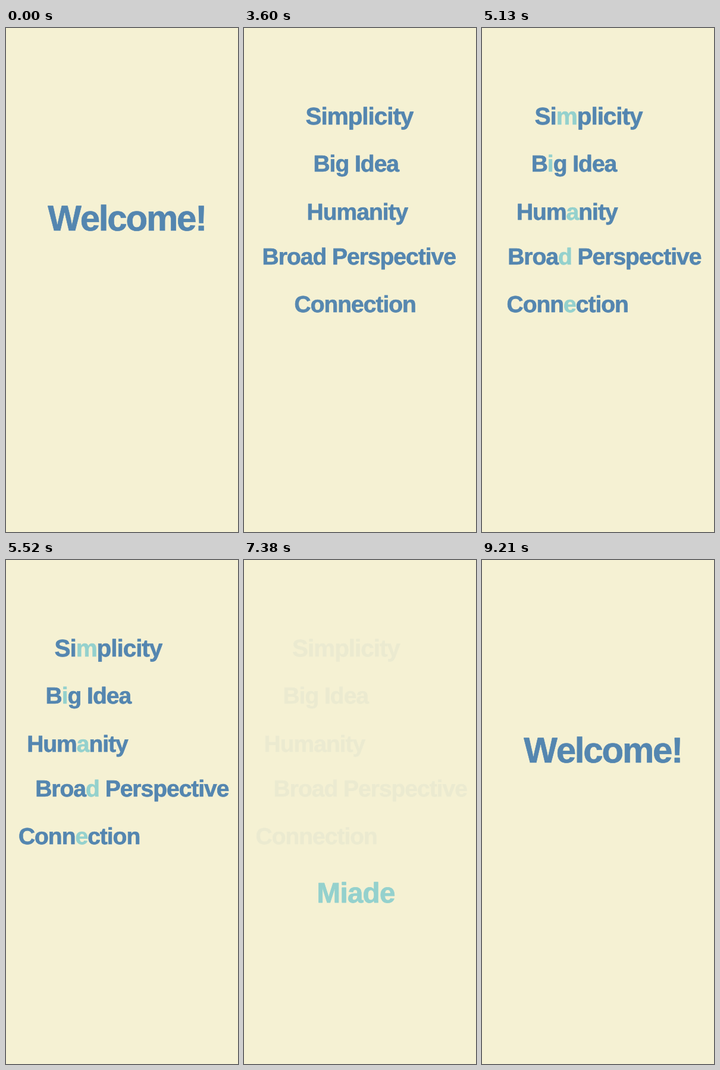
An HTML page for the animation above (9.27 s loop, 390 px wide and 846 px high).

```html
<!DOCTYPE html>
<html lang="en">
<head>
<meta charset="utf-8">
<title>Welcome</title>
<style>
  html, body { margin: 0; width: 100%; height: 100%; overflow: hidden; background: #f5f1d3; }
  svg { display: block; width: 100%; height: 100%; }
  text {
    font-family: "Liberation Sans", Arial, Helvetica, sans-serif;
    font-weight: 700;
    font-kerning: none;
    letter-spacing: -0.026em;
    text-rendering: geometricPrecision;
    fill: #5486b0;
    stroke: #5486b0;
    stroke-width: 0.7px;
    stroke-linejoin: round;
  }
  #welcome { letter-spacing: -0.037em; }
  #name { fill: #94d1cd; stroke: #94d1cd; text-anchor: middle; letter-spacing: -0.015em; }
</style>
</head>
<body>
<svg id="stage" viewBox="0 0 390 846">
  <text id="welcome" x="70.3" y="340.3" font-size="60">Welcome!</text>
  <text id="name" font-size="39">Miade</text>
</svg>
<script>
const LOOP = 9270, STEP = 30;
const BLUE = [84, 134, 176], TEAL = [148, 209, 205];

// accent: index of the highlighted letter, shift: sideways travel, show: fade-in times
const words = [
  { text: 'Simplicity',        accent: 2, x: 103.5, y: 162.4, size: 40.5, shift: -22.5, show: [430, 1060] },
  { text: 'Big Idea',          accent: 1, x: 116.4, y: 241,   size: 39,   shift: -51,   show: [1300, 1725] },
  { text: 'Humanity',          accent: 3, x: 105.6, y: 322,   size: 39,   shift: -72,   show: [1930, 2400] },
  { text: 'Broad Perspective', accent: 4, x: 30.6,  y: 397.4, size: 39,   shift: 19,    show: [2560, 2985] },
  { text: 'Connection',        accent: 4, x: 84.5,  y: 477,   size: 39,   shift: -65,   show: [3190, 3610] }
];

const stage = document.getElementById('stage');
const welcome = document.getElementById('welcome');
const nameText = document.getElementById('name');

function make(tag, text, parent) {
  const el = document.createElementNS('http://www.w3.org/2000/svg', tag);
  el.textContent = text;
  parent.appendChild(el);
  return el;
}

for (const w of words) {
  w.el = make('text', '', stage);
  w.el.setAttribute('y', w.y);
  w.el.setAttribute('font-size', w.size);
  const { text, accent } = w;
  make('tspan', text.slice(0, accent), w.el);
  w.letter = make('tspan', text[accent], w.el);
  make('tspan', text.slice(accent + 1), w.el);
}

const ramp = (t, a, b) => Math.min(1, Math.max(0, (t - a) / (b - a)));
const ease = p => (1 - Math.cos(Math.PI * p)) / 2;
const mix = (a, b, p) => a + (b - a) * p;

function draw(t) {
  const slide = ease(ramp(t, 4350, 5640));
  const leave = 1 - ramp(t, 7030, 7400);
  const tint = ramp(t, 3790, 4215) * leave;
  const color = `rgb(${BLUE.map((c, i) => Math.round(mix(c, TEAL[i], tint)))})`;

  for (const w of words) {
    w.el.setAttribute('x', w.x + w.shift * slide);
    w.el.setAttribute('opacity', ramp(t, ...w.show) * leave);
    w.letter.style.fill = w.letter.style.stroke = color;
  }

  const first = 1 - ramp(t, 430, 1060);
  welcome.setAttribute('opacity', Math.max(first, ramp(t, 8480, 9210)));

  const rise = ease(ramp(t, 7060, 8335));
  const scale = mix(1, 2.48, rise);
  nameText.setAttribute('transform',
    `translate(${mix(187.5, 191.5, rise)} ${mix(613, 354, rise)}) scale(${scale})`);
  nameText.setAttribute('opacity', ramp(t, 5990, 6750) * (1 - ramp(t, 8390, 8890)));
}

const start = performance.now();
function tick(now) {
  const t = Math.max(0, now - start) % LOOP;
  draw(Math.floor(t / STEP) * STEP);
  requestAnimationFrame(tick);
}
draw(0);
requestAnimationFrame(tick);
</script>
</body>
</html>
```
